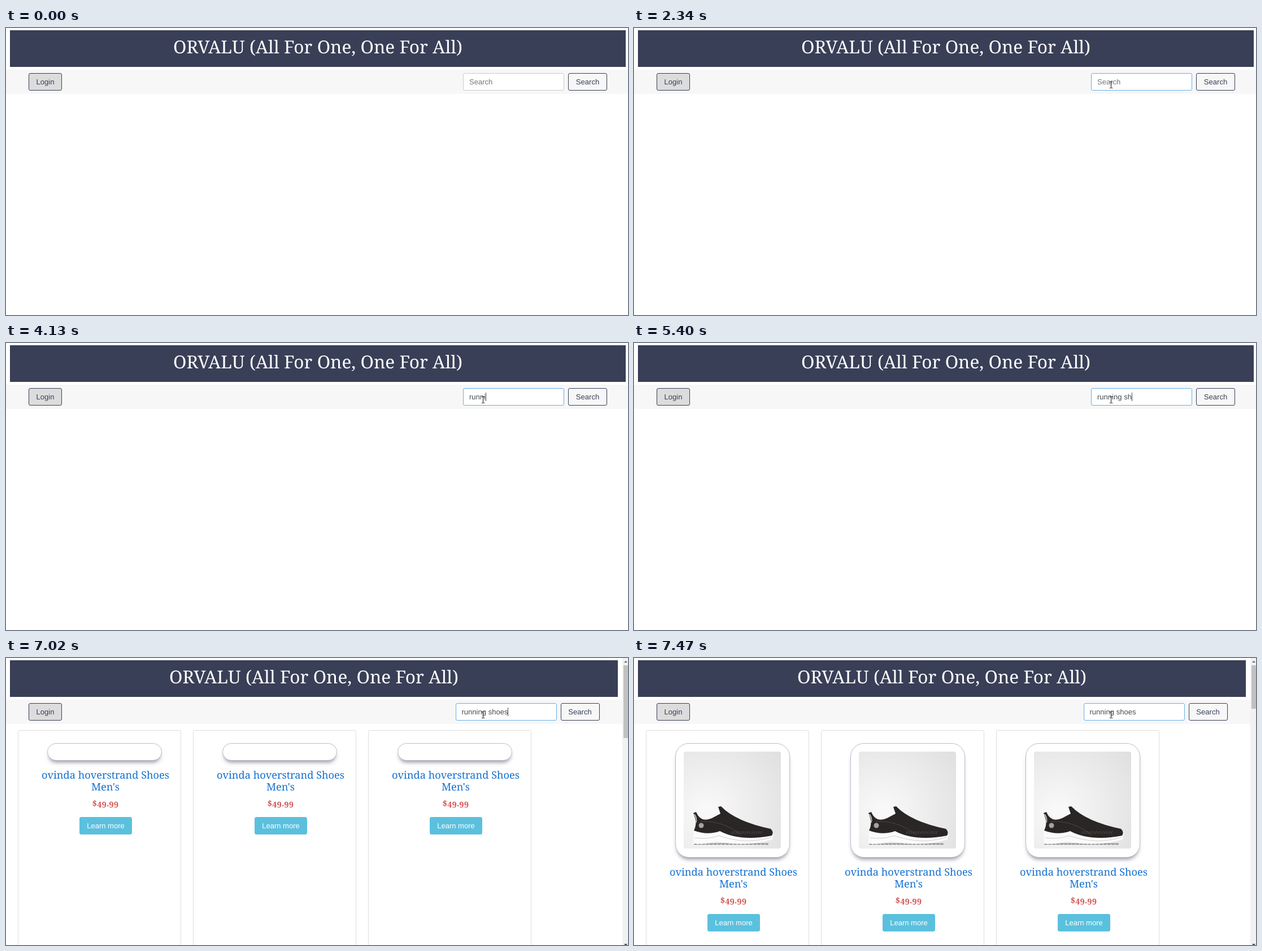
Write an HTML page with a canvas that moves like this. It is 1101 by 509 pixels and loops after 8000 ms.

```html
<!DOCTYPE html>
<html lang="en">
<head>
<meta charset="utf-8">
<title>Shop search</title>
<style>
  html, body { margin: 0; width: 100%; height: 100%; overflow: hidden; background: #fff; }
  body { position: relative; font: 13.06px/29px "Liberation Sans", Arial, sans-serif; text-rendering: geometricPrecision; }
  body * { position: absolute; box-sizing: border-box; }
  br, #typed { position: static; }
  .serif { width: 100%; font-family: "Noto Serif", serif; text-align: center; }
  #head { left: 7px; top: 4px; width: 1090px; height: 65px; margin: 0; background: #393f57; color: #fff;
    font-size: 31.6px; font-weight: 400; line-height: 60px; }
  #nav { left: 0; top: 74px; width: 1101px; height: 43px; background: #f7f7f7; }
  .btn { height: 31px; border: 1px solid #393f57; border-radius: 3px; color: #393f57; text-align: center; }
  #login { left: 40px; top: 6px; width: 59px; background: #dcdcdd; }
  #tools { left: 809px; top: 6px; }
  #field { width: 179px; height: 31px; border: 1px solid #ccc; border-radius: 3px; background: #fff;
    white-space: pre; }
  #hint, #entry { left: 10px; }
  #hint { color: #74777a; }
  #typed { color: #484c50; border-right: 1px solid transparent; }
  #go { left: 186px; width: 69px; }

  #cards, #bar { display: none; }
  .found #cards, .found #bar { display: block; }
  .found #head { width: 1076px; }
  .found #nav { width: 1091px; }
  .found #tools { left: 795.5px; }

  .card { top: 128px; width: 289px; height: 420px; border: 1px solid #ddd; border-radius: 3px; }
  .thumb { left: 51px; top: 22px; width: 203px; height: 31px; border: 1px solid #bdbccb; border-radius: 24px;
    background: #fff; box-shadow: 0 6px 7px -3px rgba(50, 48, 80, .5); }
  .thumb canvas { left: 14px; top: 14px; border-radius: 4px; display: none; }
  .info { left: 0; top: 0; width: 308px; }
  .name { top: 68.5px; color: #1270d0; font-size: 18.2px; line-height: 21.4px; }
  .price { top: 115px; color: #d2524f; font-size: 14.5px; font-weight: 700; line-height: 28px;
    font-variant-numeric: oldstyle-nums; }
  .more { left: 108px; top: 153px; width: 93px; background: #5bc0de; border-color: #5bc0de; color: #fff; }
  .coarse .thumb, .sharp .thumb { height: 203px; }
  .coarse .info, .sharp .info { top: 172px; }
  .coarse .low, .sharp .high { display: block; }

  #bar { left: 1091px; top: 0; width: 10px; height: 509px; background: #f1f1f1; overflow: hidden; }
  #thumb { left: 2px; top: 13px; width: 10px; background: #c1c1c1; }
  .tip { left: 3px; border: solid transparent; border-width: 0 3px 3px; border-bottom-color: #606060; }
  .tip.down { border-width: 3px 3px 0; border-top-color: #404040; }
</style>
</head>
<body>
<h1 id="head" class="serif">ORVALU (All For One, One For All)</h1>
<div id="nav">
  <div id="login" class="btn">Login</div>
  <div id="tools">
    <div id="field"><span id="hint">Search</span><div id="entry"><span id="typed"></span></div></div>
    <div id="go" class="btn">Search</div>
  </div>
</div>
<div id="cards"></div>
<div id="bar">
  <div class="tip" style="top:5px"></div>
  <div id="thumb"></div>
  <div class="tip down" style="top:507px"></div>
</div>
<canvas id="mouse" width="24" height="24"></canvas>
<script>
const $ = id => document.getElementById(id);
const LOOP = 8000, SIZE = 172;
const FOCUS = 1880, BLINK = 500;
const WORDS = [
  { text: 'running ', from: 3180, pace: 214 },
  { text: 'shoes', from: 5230, pace: 170 }
];

function fill(c, color, path) {
  c.fillStyle = color;
  c.fill(new Path2D(path));
}

function stroke(c, color, width, path) {
  c.strokeStyle = color;
  c.lineWidth = width;
  c.stroke(new Path2D(path));
}

function drawShoe(c, low) {
  const back = c.createRadialGradient(42, 105, 10, 42, 105, 175);
  back.addColorStop(0, '#f8f8f8');
  back.addColorStop(1, '#dedede');
  c.fillStyle = back;
  c.fillRect(0, 0, SIZE, SIZE);

  const shadow = low ? [30, 157, 110, 9] : [18, 162, 132, 3];
  c.fillStyle = '#b4b4b4';
  c.fillRect(...shadow);
  fill(c, low ? '#d8d8d8' : '#fbfbfb', 'M18 138L17 163Q36 166 58 159Q110 170 157 156L159 145L60 134Z');
  fill(c, '#292625', `M18 140C24 128 21 118 17 109L22 107Q30 127 50 118L65 110L61 98L66 97
    Q92 124 154 137Q160 143 156 149Q100 160 64 141Q42 149 18 140Z`);
  if (low) return;

  stroke(c, '#d0d0d0', 1.5, 'M19 111Q24 119 22 126');
  stroke(c, '#4a4644', 1, 'M30 124Q70 122 102 148');
  stroke(c, '#d0d0d0', 1, 'M20 153Q45 156 62 149Q110 166 155 152');
  for (let i = 0; i < 14; i++) stroke(c, '#6a6663', .7, `M${84 + i * 4} 146l3 -5`);
  for (let x = 19; x < 150; x += 7) stroke(c, '#777', 1.2, `M${x} 164.5h4`);
  c.beginPath();
  c.arc(31, 131, 4.5, 0, 7);
  c.fillStyle = '#a5a3a2';
  c.fill();
}

function makeCanvas(size) {
  const canvas = document.createElement('canvas');
  canvas.width = canvas.height = size;
  return canvas;
}

function photo(low) {
  const out = makeCanvas(SIZE), c = out.getContext('2d');
  out.className = low ? 'low' : 'high';
  if (low) {
    const small = makeCanvas(36), s = small.getContext('2d');
    s.scale(36 / SIZE, 36 / SIZE);
    drawShoe(s, true);
    c.drawImage(small, 0, 0, SIZE, SIZE);
  } else {
    drawShoe(c, false);
  }
  return out;
}

for (let i = 0; i < 3; i++) {
  const card = document.createElement('div');
  card.className = 'card';
  card.style.left = 21 + i * 310 + 'px';
  card.innerHTML = `<div class="thumb"></div><div class="info">
    <div class="name serif">ovinda hoverstrand Shoes<br>Men's</div>
    <div class="price serif">$49.99</div><div class="more btn">Learn more</div></div>`;
  card.firstChild.append(photo(true), photo(false));
  $('cards').append(card);
}

// Progress from 0 to 1, held between evenly spaced steps
function stepped(t, from, to, steps) {
  const p = Math.floor((t - from) / (to - from) * steps + 1e-6) / steps;
  return Math.min(1, Math.max(0, p));
}

function mouseAt(t) {
  const enter = stepped(t, 540, 680, 2);
  const glide = stepped(t, 850, 1390, 7);
  const ease = glide * glide * (3 - 2 * glide);
  return [
    Math.round(953 - 323 * enter + 214 * ease),
    Math.round(452 - 264 * enter - 87 * ease)
  ];
}

const pen = $('mouse').getContext('2d');

function drawMouse(t) {
  pen.clearRect(0, 0, 24, 24);
  if (t < 540) return;
  const [x, y] = mouseAt(t);
  $('mouse').style.left = x - 6 + 'px';
  $('mouse').style.top = y - 7 + 'px';
  const overField = x > 809 && x < 988 && y > 80 && y < 111;
  if (overField) {
    stroke(pen, '#111', 1, 'M6.5 2v10M4 1.5h2m1 0h2M4 12.5h2m1 0h2');
  } else {
    const arrow = 'M6.5 7.5V20L9.3 17.5L11.2 22L13 21.2L11.2 17H15Z';
    fill(pen, '#fff', arrow);
    stroke(pen, '#111', 1, arrow);
  }
}

// Text typed so far and the time of the last key
function typing(t) {
  let text = '', last = FOCUS - 40;
  for (const word of WORDS) {
    if (t < word.from) break;
    const count = Math.min(word.text.length, 1 + Math.floor((t - word.from) / word.pace));
    text += word.text.slice(0, count);
    last = word.from + (count - 1) * word.pace;
  }
  return { text, last };
}

function stage(t) {
  if (t < 7020) return '';
  if (t < 7110) return 'found';
  return t < 7160 ? 'found coarse' : 'found sharp';
}

function render(t) {
  const { text, last } = typing(t);
  const caret = t >= FOCUS && Math.floor((t - last) / BLINK) % 2 === 0;
  document.body.className = stage(t);
  $('typed').textContent = text;
  $('typed').style.borderColor = caret ? '#484c50' : 'transparent';
  $('hint').style.display = text ? 'none' : '';
  $('field').style.borderColor = t < FOCUS ? '#ccc' : t < 1950 ? '#99bedb' : '#66afe9';
  $('thumb').style.height = (t < 7390 ? 129 : 77) + 'px';
  drawMouse(t);
}

const start = performance.now();
function tick() {
  render((performance.now() - start) % LOOP);
  requestAnimationFrame(tick);
}
tick();
</script>
</body>
</html>
```
